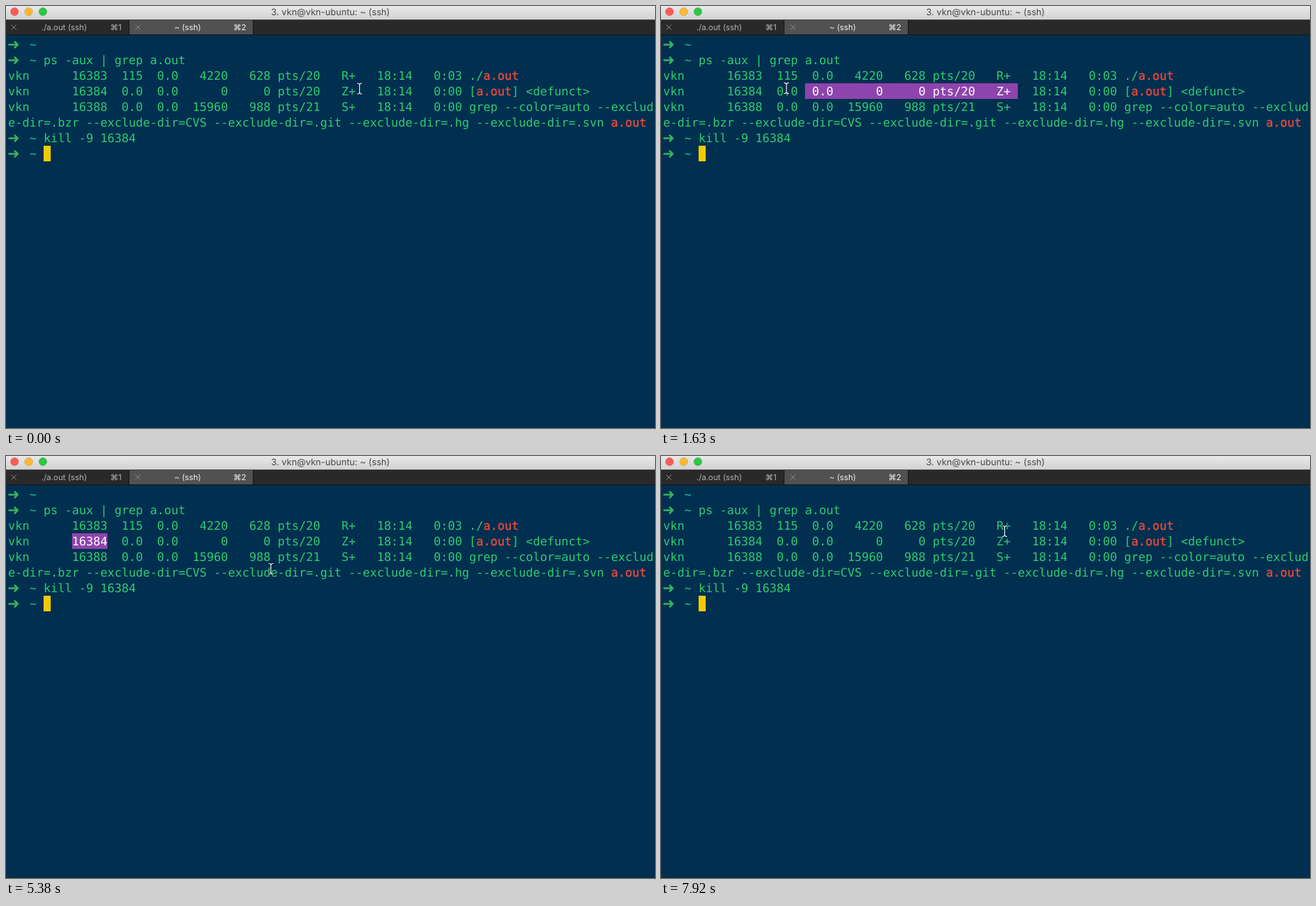
An HTML page that plays this animation: 915 by 595 pixels, repeating every 8 s.

```html
<!DOCTYPE html>
<html lang="en">
<head>
<meta charset="utf-8">
<title>Terminal</title>
<style>
  html, body { margin: 0; width: 100%; height: 100%; overflow: hidden; background: #002f50; }
  svg { display: block; }
  text { white-space: pre; text-rendering: geometricPrecision; }
  .ui { font-family: Inter, Roboto, sans-serif; font-size: 11.3px; fill: #b4b4b4; text-anchor: middle; }
  .ui.on { fill: #f2f2f2; }
  .ui.title { font-size: 12.7px; fill: #474747; }
  .light { stroke: #000; stroke-opacity: .12; }
  .mono { font: 16.61px "DejaVu Sans Mono", "Liberation Mono", monospace; fill: #2ecc71; }
  .hit { fill: #e74c3c; stroke: #e74c3c; stroke-width: .35; }
  .dir { fill: #25bd90; }
  .picked text { fill: #fff; }
  .arrow { fill: none; stroke: #36b45c; stroke-width: 2.5; stroke-linecap: round; stroke-linejoin: round; }
  .cross { stroke: #858585; stroke-width: 1; }
  .beam { fill: none; stroke-linecap: round; }
</style>
</head>
<body>
<svg width="915" height="595" viewBox="0 0 915 595">
  <defs>
    <linearGradient id="bar" x2="0" y2="1">
      <stop stop-color="#e9e9e9"/><stop offset="1" stop-color="#d2d2d2"/>
    </linearGradient>
    <clipPath id="clip"><rect class="range" y="109" height="22"/></clipPath>
    <path id="ibeam" d="M-3 -7.5Q0 -7.5 0 -5Q0 -7.5 3 -7.5M0 -5V5M-3 7.5Q0 7.5 0 5Q0 7.5 3 7.5"/>
  </defs>

  <rect width="915" height="595" fill="#002f50"/>
  <rect width="915" height="19" fill="url(#bar)"/>
  <circle class="light" cx="12" cy="8" r="5.7" fill="#fc5b57"/>
  <circle class="light" cx="32" cy="8" r="5.7" fill="#fdb92f"/>
  <circle class="light" cx="52" cy="8" r="5.7" fill="#2bc840"/>
  <text class="ui title" x="457.5" y="13">3. vkn@vkn-ubuntu: ~ (ssh)</text>

  <rect y="19" width="915" height="22" fill="#292929"/>
  <rect x="174" y="20" width="174" height="20" fill="#515151"/>
  <path d="M0 19.5H915" stroke="#484848"/>
  <path d="M0 40.5H915M173.5 20V40M348.5 20V40" stroke="#161616"/>
  <path class="cross" d="M7.5 26.5l7 7m0 -7l-7 7M182.5 26.5l7 7m0 -7l-7 7"/>
  <text class="ui" x="82" y="34">./a.out (ssh)</text>
  <text class="ui" x="155" y="34">⌘1</text>
  <text class="ui on" x="256" y="34">~ (ssh)</text>
  <text class="ui on" x="329.5" y="34">⌘2</text>

  <g id="screen"></g>
  <rect class="range" y="109" height="22" fill="#8e44ad"/>
  <g id="picked" class="picked" clip-path="url(#clip)"></g>
  <rect x="53" y="197" width="10" height="22" fill="#f1cb00"/>
  <g id="mouse" class="beam">
    <use href="#ibeam" stroke="#001a2c" stroke-opacity=".65" stroke-width="2.8"/>
    <use href="#ibeam" stroke="#f4f4f4" stroke-width="1.2"/>
  </g>
</svg>
<script>
const LEFT = 3, TOP = 43, CELL = 10, LINE = 22;
const LOOP = 8000, TICK = 150;
const DRAG = 1480, WORD = 4330, CLEAR = 6270;
const PROMPT = '>  ~ ';
const lines = [
  PROMPT,
  PROMPT + 'ps -aux | grep a.out',
  'vkn      16383  115  0.0   4220   628 pts/20   R+   18:14   0:03 ./{a.out}',
  'vkn      16384  0.0  0.0      0     0 pts/20   Z+   18:14   0:00 [{a.out}] <defunct>',
  'vkn      16388  0.0  0.0  15960   988 pts/21   S+   18:14   0:00 grep --color=auto --exclud',
  'e-dir=.bzr --exclude-dir=CVS --exclude-dir=.git --exclude-dir=.hg --exclude-dir=.svn {a.out}',
  PROMPT + 'kill -9 16384',
  PROMPT
];

const linear = p => p;
const smooth = p => p * p * (3 - 2 * p);
const brake = p => 1 - (1 - p) ** 2.74;

// Each move runs for a number of ticks; via is the control point of a curve.
const start = [498.5, 116.5];
const moves = [
  { at: 140, ticks: 2, to: [502.5, 121.5] },
  { at: 1180, ticks: 1, to: [488, 122] },
  { at: 1330, ticks: 1, to: [499, 125.5] },
  { at: DRAG, ticks: 4, to: [120, 117], via: [310, 112], ease: brake },
  { at: 2380, ticks: 2, to: [118.5, 118.5] },
  { at: 4780, ticks: 8, to: [496, 144.5], via: [300, 184], ease: smooth },
  { at: 6570, ticks: 2, to: [427, 139.5] },
  { at: 7020, ticks: 3, to: [675, 151] },
  { at: 7470, ticks: 1, to: [667, 151.5] },
  { at: 7920, ticks: 1, to: [484.5, 106] }
];

const byId = id => document.getElementById(id);
const mix = (a, b, p) => a + (b - a) * p;

function pointer(t) {
  let pos = start;
  for (const { at, ticks, to, via, ease = linear } of moves) {
    if (t < at) break;
    const p = ease(Math.min(1, (Math.floor((t - at) / TICK) + 1) / ticks));
    pos = pos.map((a, i) => {
      const mid = via ? via[i] : (a + to[i]) / 2;
      return mix(mix(a, mid, p), mix(mid, to[i], p), p);
    });
  }
  return pos;
}

// The dragged edge trails the pointer a little, then a double click picks the word.
function selection(t) {
  if (t < DRAG || t >= CLEAR) return [0, 0];
  if (t >= WORD) return [9, 14];
  const x = mix(pointer(t)[0], pointer(t - TICK)[0], .25);
  return [Math.round((x - LEFT) / CELL), 50];
}

function add(parent, tag, attrs, text = '') {
  const el = document.createElementNS('http://www.w3.org/2000/svg', tag);
  for (const key in attrs) el.setAttribute(key, attrs[key]);
  el.textContent = text;
  parent.append(el);
}

// Braces mark search hits; every word is placed on the character grid.
function drawLine(parent, line, row) {
  const top = TOP + row * LINE;
  let col = 0;
  for (const part of line.match(/\{[^}]*\}|\s+|[^\s{]+/g)) {
    const hit = part[0] === '{';
    const word = hit ? part.slice(1, -1) : part;
    const x = LEFT + col * CELL;
    if (part === '>') {
      add(parent, 'path', { class: 'arrow', d: `M${x + 1.5} ${top + 11.5}h12m-4 -4l4 4l-4 4` });
    } else if (word.trim()) {
      const kind = hit ? 'mono hit' : part === '~' ? 'mono dir' : 'mono';
      add(parent, 'text', { class: kind, x, y: top + 17 }, word);
    }
    col += word.length;
  }
}

lines.forEach((line, row) => drawLine(byId('screen'), line, row));
drawLine(byId('picked'), lines[3].replace(/[{}]/g, ''), 3);

const ranges = document.querySelectorAll('.range');

function frame() {
  const t = performance.now() % LOOP;
  const [from, to] = selection(t);
  byId('mouse').setAttribute('transform', `translate(${pointer(t)})`);
  for (const r of ranges) {
    r.setAttribute('x', LEFT + from * CELL);
    r.setAttribute('width', (to - from) * CELL);
  }
  requestAnimationFrame(frame);
}
frame();
</script>
</body>
</html>
```
